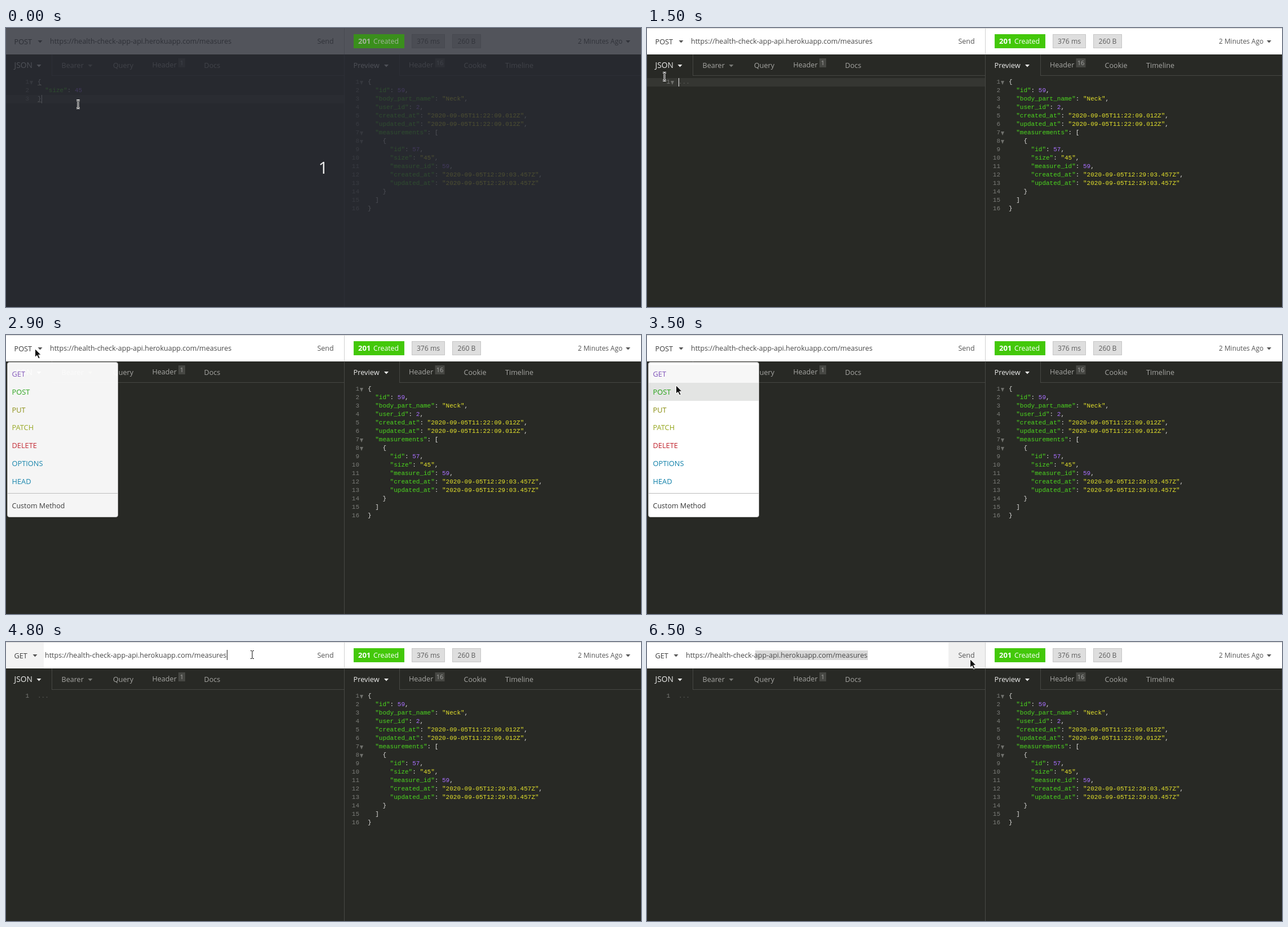
An HTML page with a canvas for the animation above (8000 ms loop, 1127 px wide and 496 px high).

```html
<!DOCTYPE html>
<html lang="en">
<head>
<meta charset="utf-8">
<title>API client</title>
<style>
  html, body { margin: 0; width: 100%; height: 100%; overflow: hidden; background: #282925; }
  canvas { display: block; }
</style>
</head>
<body>
<canvas id="stage" width="1127" height="496"></canvas>
<script>
const ctx = document.getElementById('stage').getContext('2d');
const LOOP = 8000;
const UI = '"Open Sans", sans-serif';
const MONO = '11px "Liberation Mono", monospace';
const CHAR = 6.6, LINE = 15;
const DARK = '#282925', RULE = '#474844', INK = '#3c3c3c', MUTED = '#a6a6a3', LIGHT = '#ededec';
const GREEN = '#43c80a';
const URL_TEXT = 'https://health-check-app-api.herokuapp.com/measures';
const REQUEST = ['{', '  "size": 45', '}'];
const RESPONSE = `{
  "id": 59,
  "body_part_name": "Neck",
  "user_id": 2,
  "created_at": "2020-09-05T11:22:09.012Z",
  "updated_at": "2020-09-05T11:22:09.012Z",
  "measurements": [
    {
      "id": 57,
      "size": "45",
      "measure_id": 59,
      "created_at": "2020-09-05T12:29:03.457Z",
      "updated_at": "2020-09-05T12:29:03.457Z"
    }
  ]
}`.split('\n');
const METHODS = [['GET', '#7d50b8'], ['POST', '#22a012'], ['PUT', '#868a08'], ['PATCH', '#93a51a'],
  ['DELETE', '#c0222c'], ['OPTIONS', '#0d7fa8'], ['HEAD', '#0d7fa8']];

// Pointer path: time, x, y
const PATH = [[0, 128, 135], [600, 128, 135], [800, 31, 86], [1600, 31, 86], [1900, 38, 55], [2000, 38, 55],
  [2300, 51, 24], [3000, 51, 24], [3500, 51, 89], [3600, 55, 76], [3800, 55, 76], [4600, 437, 22],
  [5000, 437, 22], [5200, 74, 12], [5400, 148, 12], [5600, 148, 12], [5700, 206, 13], [5800, 206, 13],
  [5900, 428, 36], [6100, 428, 36], [6300, 550, 30], [6400, 550, 30], [6500, 573, 30], [LOOP, 573, 30]];

const within = (t, from, to) => t >= from && t < to;
const clamp = v => Math.max(0, Math.min(1, v));

function box(x, y, w, h, color) {
  ctx.fillStyle = color;
  ctx.fillRect(x, y, w, h);
}

function text(str, x, y, color, font = `12.6px ${UI}`, align = 'left') {
  ctx.font = font;
  ctx.textAlign = align;
  ctx.fillStyle = color;
  ctx.fillText(str, x, y);
}

function triangle(x, y, w, h, color) {
  ctx.fillStyle = color;
  ctx.beginPath();
  ctx.moveTo(x, y);
  ctx.lineTo(x + w, y);
  ctx.lineTo(x + w / 2, y + h);
  ctx.fill();
}

const dropArrow = (x, y, color) => triangle(x, y, 8, 4.5, color);

function codeLine(line, x, y) {
  for (const m of line.matchAll(/"[^"]*"(?=:)|"[^"]*"|\d+|[^\s"\d]+/g)) {
    const token = m[0];
    const color = token[0] === '"' ? (line[m.index + token.length] === ':' ? '#4cd81f' : '#e4e22c')
      : /\d/.test(token) ? '#a970ff' : '#dededc';
    text(token, x + m.index * CHAR, y, color, MONO);
  }
}

function editor(lines, x, folds) {
  lines.forEach((line, i) => {
    const y = 99 + i * LINE;
    text(i + 1, x - 15, y, '#7b7c78', MONO, 'right');
    if (folds.includes(i)) triangle(x - 14, y - 5, 6, 7, '#6e6f6b');
    codeLine(line, x, y);
  });
}

function badge(label, x, w) {
  box(x, 11, w, 25, '#c6c6c6');
  box(x + 1, 12, w - 2, 23, '#dedede');
  text(label, x + w / 2, 28, '#5c5c5c', `12.2px ${UI}`, 'center');
}

function tabs(x, right, edge, active, arrowX, rest) {
  box(edge, 47, 1, 37, RULE);
  box(edge, 84, right - edge, 1, RULE);
  text(active, x, 71, LIGHT, `${active === 'JSON' ? 13.8 : 12.8}px ${UI}`);
  dropArrow(arrowX, 65, LIGHT);
  for (const [label, tx, count, w] of rest) {
    text(label, tx, count ? 70 : 71, MUTED);
    if (!count) continue;
    const bx = tx + 46.5;
    box(bx, 54, w, 16, '#464743');
    text(count, bx + w / 2, 66, MUTED, `11px ${UI}`, 'center');
  }
}

function successBadge(fill, ink) {
  box(617, 11, 90, 25, fill);
  text('201', 625, 28, ink, `bold 13px ${UI}`);
  text('Created', 652, 28, ink, `12.3px ${UI}`);
}

function header(t, pointerX) {
  const changed = t >= 4000;
  const urlX = changed ? 69 : 78;
  box(0, 0, 1127, 47, '#fff');
  box(0, 0, 1127, 1, '#d2d2d2');
  box(600, 0, 1, 47, '#d0d0d0');
  if (within(t, 4000, 5100)) box(0, 1, 67, 46, '#f3f3f3');
  if (t >= 6300) box(535, 1, 65, 46, '#f0f0f0');
  if (t >= 5100) {
    const start = t < 5700 ? Math.max(69, pointerX - 5) : 192;
    box(start, 15, 392 - start, 17, '#d9d9d9');
  }
  text(changed ? 'GET' : 'POST', 14.5, 28.5, INK, `12.7px ${UI}`);
  dropArrow(changed ? 47.5 : 56.5, 22, '#555');
  text(URL_TEXT, urlX, 28, '#484848', `12.53px ${UI}`);
  if (within(t, 4800, 5100)) box(392, 14, 1, 18, '#222');
  text('Send', 552.5, 28, '#555', `12.5px ${UI}`);
  successBadge(GREEN, '#fff');
  badge('376 ms', 720, 59);
  badge('260 B', 792, 51);
  text('2 Minutes Ago', 1015, 28, '#555', `11.9px ${UI}`);
  dropArrow(1100, 22, '#555');
}

function requestBody(t) {
  if (t >= 1500) {
    if (t < 2700) box(0, 89, 600, LINE, '#353632');
    text('1', 41, 99, '#7b7c78', MONO, 'right');
    if (t < 1700) triangle(42, 94, 6, 7, '#6e6f6b');
    text('...', 56, 99, '#5c5d59', MONO);
    if (t < 1900 || within(t, 2500, 2700)) box(56, 89, 1, LINE, '#eee');
    return;
  }
  if (t < 700) {
    box(0, 119, 600, LINE, '#353632');
    box(63, 119, 1, LINE, '#eee');
    box(56, 101, 7, 1, '#b9b9a0');
    box(56, 131, 7, 1, '#b9b9a0');
  } else {
    const selection = '#4a4b47', all = t >= 800;
    if (all) box(56, 89, 540, LINE, selection);
    box(all ? 56 : 82, 104, all ? 540 : 514, LINE, selection);
    box(56, 119, 7, LINE, selection);
  }
  editor(REQUEST, 56, [0]);
}

function menu(t) {
  const alpha = t < 3900 ? clamp((t - 2600) / 315) : clamp((4200 - t) / 400);
  if (t < 2700 || !alpha) return;
  ctx.save();
  ctx.globalAlpha = alpha;
  ctx.fillStyle = '#fff';
  ctx.strokeStyle = '#c8c8c8';
  ctx.beginPath();
  ctx.roundRect(2.5, 48.5, 196, 275, 3.5);
  ctx.fill();
  ctx.stroke();
  if (t >= 3300) box(3, 53, 195, 32, t < 3600 ? '#f7f7f7' : '#e3e4e3');
  if (within(t, 3400, 3600)) box(3, 85, 195, 32, '#e3e4e3');
  METHODS.forEach(([name, color], i) => text(name, 10.5, 74 + i * 31.83, color, `12.8px ${UI}`));
  box(3, 281, 195, 1, '#bbb');
  text('Custom Method', 10.5, 308, '#333', `12.5px ${UI}`);
  ctx.restore();
}

function pointerAt(t) {
  const i = PATH.findIndex(p => p[0] > t);
  const [t0, x0, y0] = PATH[i - 1], [t1, x1, y1] = PATH[i];
  const k = (t - t0) / (t1 - t0);
  return [Math.round(x0 + (x1 - x0) * k), Math.round(y0 + (y1 - y0) * k)];
}

function pointer(x, y, arrow) {
  ctx.save();
  ctx.translate(x, y);
  if (arrow) {
    const shape = new Path2D('M.5 .5V15.5L4 12.3L6.7 18L9.2 16.8L6.6 11.3H11Z');
    ctx.fillStyle = '#111';
    ctx.strokeStyle = '#fff';
    ctx.fill(shape);
    ctx.stroke(shape);
  } else {
    const shape = new Path2D('M-3 -6.5H-1L0 -5.5L1 -6.5H3M0 -5.5V6.5M-3 7.5H-1L0 6.5L1 7.5H3');
    for (const [width, color] of [[3, '#fff'], [1, '#000']]) {
      ctx.lineWidth = width;
      ctx.strokeStyle = color;
      ctx.stroke(shape);
    }
  }
  ctx.restore();
}

function draw(now) {
  const t = Math.floor(now % LOOP / 100) * 100;
  const [px, py] = pointerAt(t);
  box(0, 0, 1127, 496, DARK);
  header(t, px);
  box(600, 47, 1, 449, RULE);
  tabs(14.5, 600, 81, 'JSON', 54.5, [['Bearer', 98.5], ['Query', 190], ['Header', 259.5, '1', 12], ['Docs', 351.5]]);
  dropArrow(145.5, 65, '#777874');
  tabs(616.5, 1127, 698, 'Preview', 671, [['Header', 715, '16', 17], ['Cookie', 812.5], ['Timeline', 886]]);
  requestBody(t);
  editor(RESPONSE, 642, [0, 6, 7]);
  menu(t);
  if (t < 300) {
    box(0, 0, 1127, 496, 'rgba(39,42,50,.8)');
    successBadge('#3a8f1c', '#a3b39d');
    text('1', 563, 259, '#eee', `30px ${UI}`, 'center');
  }
  pointer(px, py, within(t, 1800, 4300) || t >= 6200);
}

function frame(now) {
  draw(now);
  requestAnimationFrame(frame);
}
requestAnimationFrame(frame);
</script>
</body>
</html>
```
